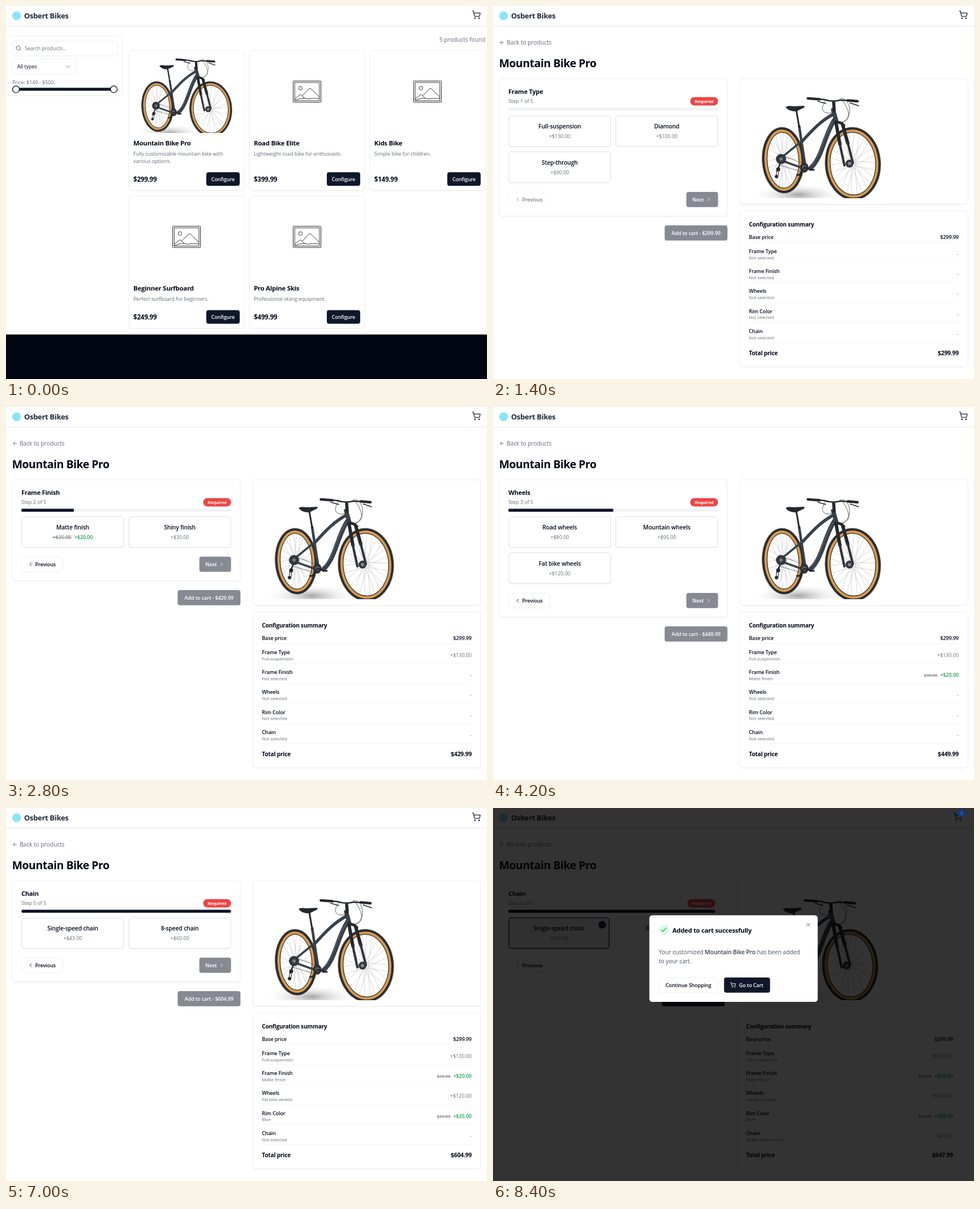
An HTML page for the animation above (9100 ms loop, 850 px wide and 658 px high).

```html
<!DOCTYPE html>
<html lang="en">
<head>
<meta charset="utf-8">
<title>Bike shop configurator</title>
<style>
  html, body { margin: 0; width: 100%; height: 100%; overflow: hidden; background: #fff; }
  svg { display: block; width: 850px; height: 658px; }
  text { font-family: "Open Sans", "Noto Sans", sans-serif; letter-spacing: -.008em; white-space: pre; }
  .b { font-weight: 600; letter-spacing: -.015em; }
  .h { font-weight: 700; letter-spacing: -.022em; }
  .m { text-anchor: middle; }
  .e { text-anchor: end; }
  .s { text-decoration: line-through; }
  .line { fill: none; stroke-linecap: round; stroke-linejoin: round; }
  .scene { visibility: hidden; animation: show 9.1s step-end infinite; animation-delay: calc(var(--i) * .7s - 9.1s); }
  @keyframes show {
    0% { visibility: visible; }
    7.7%, 100% { visibility: hidden; }
  }
</style>
</head>
<body>
<svg id="stage" viewBox="0 0 850 658" xmlns="http://www.w3.org/2000/svg"></svg>
<script>
const INK = '#020817', DARK = '#0f172a', GRAY = '#666c77', EDGE = '#e5e7eb', GREEN = '#16a34a';
const BASE = 299.99;
const money = v => '$' + v.toFixed(2);

const text = (x, y, s, size = 9.33, cls = '', fill = INK) =>
  `<text x="${x}" y="${y}" font-size="${size * .97}" class="${cls}" fill="${fill}">${s}</text>`;
const rect = (x, y, w, h, r = 0, fill = '#fff', stroke = 'none', sw = .67) =>
  `<rect x="${x}" y="${y}" width="${w}" height="${h}" rx="${r}" fill="${fill}" stroke="${stroke}" stroke-width="${sw}"/>`;
const circle = (x, y, r, fill = 'none', stroke = 'none', sw = 1) =>
  `<circle cx="${x}" cy="${y}" r="${r}" fill="${fill}" stroke="${stroke}" stroke-width="${sw}"/>`;
const line = (d, stroke = INK, sw = 1) =>
  `<path class="line" d="${d}" stroke="${stroke}" stroke-width="${sw}"/>`;
const card = (x, y, w, h) =>
  rect(x, y + .7, w, h, 5.3, '#f3f3f4') + rect(x + .33, y + .33, w - .67, h - .67, 5, '#fff', EDGE);
const fade = (s, o) => `<g opacity="${o}">${s}</g>`;

// Icons drawn on a 24 unit grid
const icon = (x, y, size, d, color = INK) =>
  `<g transform="translate(${x} ${y}) scale(${size / 24})">${line(d, color, 2)}</g>`;
const ICON = {
  cart: 'M2 2h2l2.7 12.4a2 2 0 0 0 2 1.6h9.8a2 2 0 0 0 1.9-1.6L22 7H5.1M7 21a1 1 0 1 0 2 0 1 1 0 1 0-2 0M18 21a1 1 0 1 0 2 0 1 1 0 1 0-2 0',
  search: 'M3 11a8 8 0 1 0 16 0 8 8 0 1 0-16 0M21 21l-4.3-4.3',
  down: 'M6 9l6 6 6-6',
  left: 'M15 18l-6-6 6-6',
  right: 'M9 18l6-6-6-6',
  back: 'M12 19l-7-7 7-7M19 12H5',
  check: 'M20 6L9 17l-5-5',
  close: 'M18 6L6 18M6 6l12 12'
};

function wheel(cx, cy, rx, ry) {
  const ring = (d, color, sw, extra = '') =>
    `<ellipse rx="${rx - d}" ry="${ry - d}" fill="none" stroke="${color}" stroke-width="${sw}" ${extra}/>`;
  let spokes = '';
  for (let k = 0; k < 26; k++) {
    const a = k * Math.PI / 13, b = a + (k % 2 ? .9 : -.9);
    spokes += `M${4 * Math.cos(b)} ${5 * Math.sin(b)}L${(rx - 9) * Math.cos(a)} ${(ry - 9) * Math.sin(a)}`;
  }
  return `<g transform="translate(${cx} ${cy}) rotate(-3)">`
    + line(spokes, '#a5a7aa', .45) + ring(9, '#2b2d31', 1.8) + ring(6.5, '#dd9b48', 4.3)
    + ring(2.6, '#2a2c30', 3.9) + ring(.6, '#2a2c30', 1.4, 'stroke-dasharray="2 1.2"') + '</g>';
}

function bike() {
  const frame = '#39414a', black = '#25282d';
  return '<ellipse cx="540" cy="333" rx="82" ry="21" fill="url(#shade)"/>'
    + wheel(512.5, 272, 37.3, 58.5)
    + line('M509 268L546 238M511 273L550 287', frame, 3.6)
    + line('M506 262L549 278M507 281L548 293', '#55585c', .8)
    + circle(509, 270, 9, '#34373c') + circle(509, 270, 3, '#777b80')
    + line('M507 279L502 291', black, 2.6)
    + circle(504, 288, 3.6, black) + circle(501, 301, 3, black)
    + line('M501 291V300M505 291L504 300', black, 1)
    + line('M541 212L552 284', frame, 4.6)
    + line('M536 184L541 213', black, 3)
    + '<path d="M517 178Q522 175 530 177L550 176Q552 179 546 181L536 186Q522 186 517 178Z" fill="#25282d"/>'
    + line('M546 239C560 224 576 204 603 190', frame, 5.4)
    + line('M604 200C586 226 582 268 561 286', frame, 8)
    + line('M601 204C585 226 580 262 563 280', '#586069', 1.4)
    + line('M601 183L607 204', frame, 7.5)
    + `<ellipse cx="550" cy="285" rx="7.500" ry="9" fill="#2f3237"/>` + circle(550, 285, 4, '#5a5e63')
    + line('M550 285L562 289M550 285L542 297', black, 2.4)
    + line('M560 289h7M537 298h8', black, 2.8)
    + wheel(636, 278, 49.5, 64.5)
    + line('M606 205L613 244M618 210L627 242', black, 6)
    + line('M613 244L621 281M627 242L636 277', '#30343a', 4.2)
    + line('M605 206Q614 203 620 211', black, 5)
    + circle(630, 278, 7, '#34373c') + circle(630, 278, 3, '#85888c')
    + line('M602 170L603 184', black, 5.5)
    + line('M556 163L585 165Q600 170 614 166L645 168', black, 2.6)
    + line('M556.500 163L577 164.500M627 166.500L644 168', black, 4.6)
    + line('M574 168L588 172M631 171L646 176', black, 1.6)
    + line('M588 166C576 184 584 192 601 188M618 167C634 190 632 206 610 205M613 164C630 158 640 196 616 206', '#3a3d42', .8);
}

function placeholder(cx, cy) {
  return `<g transform="translate(${cx} ${cy})">`
    + rect(-24.5, -18.7, 49, 37.4, .8, '#fff', '#222', 1) + rect(-21.8, -16, 43.6, 32, 0, '#fff', '#222', .9)
    + circle(-11.7, -6, 3.2, 'none', '#222', .9)
    + line('M-21.8 13L-13 5.8Q-11.5 4.8 -10 6.2L-4 12M-8.5 7.5L3.5 -5Q5 -6.4 6.8 -5L21.8 9.5M-21.8 15.5Q-8 9.5 1 12.8Q10 11.5 21.8 12', '#222', .9)
    + '</g>';
}

const header = right => rect(0, 0, 850, 658)
  + rect(0, 34.7, 850, .8, 0, EDGE) + rect(0, 35.5, 850, 1, 0, '#f4f4f5')
  + circle(18.7, 17.2, 7.8, '#8be4fb')
  + text(32, 21.7, 'Osbert Bikes', 13.33, 'h', '#1f2937')
  + icon(right - 16, 7.67, 16, ICON.cart, '#1f2937');

function shop() {
  const goods = [
    ['Mountain Bike Pro', 299.99, 'Fully customizable mountain bike with', 'various options.'],
    ['Road Bike Elite', 399.99, 'Lightweight road bike for enthusiasts.'],
    ['Kids Bike', 149.99, 'Simple bike for children.'],
    ['Beginner Surfboard', 249.99, 'Perfect surfboard for beginners.'],
    ['Pro Alpine Skis', 499.99, 'Professional skiing equipment.']
  ];
  let out = header(839.33)
    + card(2.7, 53.3, 203, 105)
    + rect(11, 62, 186, 26, 4, '#fff', EDGE) + icon(16.7, 69, 10.67, ICON.search, '#4b5563')
    + text(33, 78.3, 'Search products...', 9.33, '', GRAY)
    + rect(11, 94, 113, 26, 4, '#fff', EDGE) + text(20, 110.3, 'All types')
    + icon(104.7, 101.8, 10.67, ICON.down, GRAY)
    + text(11, 138, 'Price: $149 - $500', 9.33, '', GRAY)
    + rect(11, 144.2, 186, 5.3, 2.67, DARK)
    + circle(17.7, 146.9, 6, '#fff', DARK, 1.33) + circle(190.5, 146.9, 6, '#fff', DARK, 1.33)
    + text(847.3, 63, '5 products found', 10.67, 'e', GRAY);
  goods.forEach(([name, price, ...info], i) => {
    const row = i / 3 | 0, x = 216.7 + i % 3 * 212.9, y = 78 + row * 256.3;
    const foot = row ? 536.5 : 293.3;
    out += card(x, y, 204.7, row ? 234.5 : 247.7)
      + (i ? placeholder(x + 102.4, y + 73) : '<g clip-path="url(#thumb)"><use href="#bike" transform="translate(-123.4 -30.1) scale(.763)"/></g>')
      + text(x + 8.3, y + 168, name, 11.8, 'h')
      + info.map((s, k) => text(x + 8.3, y + 185.5 + k * 13.3, s, 9.33, '', GRAY)).join('')
      + text(x + 8.3, foot + 16.5, money(price), 12, 'h')
      + rect(x + 137.3, foot, 59, 24, 4, DARK)
      + text(x + 166.8, foot + 15.3, 'Configure', 9.33, 'b m', '#fff');
  });
  return out + rect(0, 579.5, 850, 78.5, 0, '#020612');
}

// Options: name, price, former price, blocked
const PARTS = [
  { name: 'Frame Type', pick: 0, opts: [['Full-suspension', 130], ['Diamond', 100], ['Step-through', 90]] },
  { name: 'Frame Finish', pick: 0, opts: [['Matte finish', 20, 35], ['Shiny finish', 30]] },
  { name: 'Wheels', pick: 2, opts: [['Road wheels', 80], ['Mountain wheels', 95], ['Fat bike wheels', 120]] },
  { name: 'Rim Color', pick: 2, opts: [['Red', 20, 0, true], ['Black', 15], ['Blue', 35, 20]] },
  { name: 'Chain', pick: 0, opts: [['Single-speed chain', 43], ['8-speed chain', 60]] }
];
const chosen = p => p.opts[p.pick];

function option([name, price, old, blocked], x, y, w, h, on) {
  const mid = x + w / 2;
  const cost = old
    ? `<tspan class="s">+${money(old)}</tspan><tspan dx="5.5" class="b" fill="${price < old ? GREEN : '#ea6a1c'}">+${money(price)}</tspan>`
    : '+' + money(price);
  return rect(x, y + .8, w, h, 5.3, '#f3f3f4')
    + rect(x + .67, y + .67, w - 1.33, h - 1.33, 4.7, on ? '#f1f2f4' : blocked ? '#f4f5f7' : '#fff', on ? DARK : EDGE, 1.33)
    + text(mid, y + 23.3, name, 10.67, 'b m', blocked ? '#7d838e' : INK)
    + text(mid, y + 40.3, cost, 9.33, 'm', blocked ? '#a4a9b2' : GRAY)
    + (blocked ? text(mid, y + 56.3, 'Incompatible with your selection', 8, 'b m', '#a4a9b2') : '')
    + (on ? circle(x + w - 13, y + 13, 6.67, DARK) + icon(x + w - 17, y + 9, 8, ICON.check, '#fff') : '');
}

function summary(x, right, count, total) {
  const r = right - 16.5, l = x + 16.6;
  let out = card(x, 360.7, right - x, 276)
    + text(l, 389, 'Configuration summary', 10.4, 'h')
    + text(l, 411, 'Base price', 9.33, 'b') + text(r, 411, money(BASE), 9.33, 'b e')
    + rect(l, 417, r - l, .7, 0, '#eff0f2');
  PARTS.forEach((p, i) => {
    const y = 436 + i * 35.2, set = i < count, [name, price, old] = chosen(p);
    const cost = !set ? '-' : old
      ? `<tspan class="s" font-size="7.76">${money(old)}</tspan><tspan dx="5" class="b" fill="${GREEN}">+${money(price)}</tspan>`
      : '+' + money(price);
    out += text(l, y, p.name, 9.33, 'b') + text(l, y + 10.8, set ? name : 'Not selected', 8, '', GRAY)
      + text(r, y + 5, cost, 9.33, 'e', GRAY) + rect(l, y + 16.4, r - l, .7, 0, '#eff0f2');
  });
  return out + text(l, 616, 'Total price', 10.5, 'h') + text(r, 616, money(total), 10.67, 'h e');
}

function configure(step, picked, right = 839.33) {
  const part = PARTS[step], left = 10.67, w = (right - left - 21.33) / 2, edge = left + w;
  const l = 27.3, r = edge - 16.67, optW = (r - l - 8) / 2, x2 = edge + 21.33;
  const count = step + picked, last = step === 4;
  const total = PARTS.slice(0, count).reduce((sum, p) => sum + chosen(p)[1], BASE);
  const firstH = part.opts[0][3] ? 71.3 : 55.3;
  const top = 193, row2 = top + firstH + 8.3;
  const foot = Math.round((part.opts.length > 2 ? row2 + 55.3 : top + firstH) + 16);
  const bottom = foot + 43, add = bottom + 16;
  const prev = rect(l + .3, foot + .3, 73, 26, 4, '#fff', EDGE)
    + icon(38.3, foot + 8, 10.67, ICON.left) + text(51.5, foot + 16.7, 'Previous', 9.33, 'b');
  const next = rect(r - 56, foot, 56, 26.67, 4, DARK)
    + text(r - 45.3, foot + 16.7, 'Next', 9.33, 'b', '#fff') + icon(r - 21.5, foot + 8, 10.67, ICON.right, '#fff');
  const buy = rect(edge - 111, add, 111, 26.67, 4, DARK)
    + text(edge - 55.5, add + 16.7, 'Add to cart - ' + money(total), 9.33, 'b m', '#fff');

  return header(right)
    + icon(10.5, 59, 10.67, ICON.back, GRAY) + text(24, 68, 'Back to products', 10.67, '', GRAY)
    + text(left, 107.5, 'Mountain Bike Pro', 20, 'h')
    + card(left, 128, w, bottom - 128)
    + text(l, 155.3, part.name, 11.4, 'h') + text(l, 171, `Step ${step + 1} of 5`, 9.33, '', GRAY)
    + rect(r - 49.2, 160.7, 49.2, 14.7, 7.3, '#ef4444') + text(r - 24.6, 171, 'Required', 8, 'h m', '#fff')
    + rect(l, 179.5, r - l, 5.3, 2.67, '#f1f2f4')
    + (step ? rect(l, 179.5, (r - l) * step / 4, 5.3, last ? 2.67 : 1.2, '#0f1129') : '')
    + part.opts.map((o, i) => option(o, l + i % 2 * (optW + 8), i < 2 ? top : row2, optW, i < 2 ? firstH : 55.3, picked && i === part.pick)).join('')
    + fade(prev, step ? 1 : .5) + fade(next, picked && !last ? 1 : .5) + fade(buy, picked && last ? 1 : .5)
    + card(x2, 128, right - x2, 222)
    + `<use href="#bike" clip-path="url(#photo)" x="${(right - 839.33) / 2}"/>`
    + summary(x2, right, count, total);
}

function added() {
  return configure(4, 1, 829.33)
    + rect(0, 0, 850, 658, 0, 'rgba(0,0,0,.8)')
    + circle(828, 9, 6.67, '#143a85') + text(828, 11.9, '1', 8, 'm', '#a9b6d0')
    + rect(276.3, 189.3, 297.5, 152.7, 5.3)
    + circle(302, 215, 9.3, '#dcfce7') + icon(295.3, 208.3, 13.33, ICON.check, GREEN)
    + text(317, 220, 'Added to cart successfully', 11.6, 'h')
    + icon(551.8, 200.5, 10.67, ICON.close, '#4b5563')
    + text(293, 257.5, 'Your customized <tspan class="b" fill="#374151">Mountain Bike Pro</tspan> has been added', 10.67, '', '#4b5563')
    + text(293, 273.5, 'to your cart.', 10.67, '', '#4b5563')
    + rect(293.3, 299.3, 104.4, 26, 4, '#fff', EDGE) + text(345.3, 315.5, 'Continue Shopping', 9.33, 'b m')
    + rect(408.3, 299, 81.3, 26.67, 4, DARK) + icon(419, 306.8, 10.67, ICON.cart, '#fff')
    + text(434.7, 315.5, 'Go to Cart', 9.33, 'b', '#fff');
}

const scenes = [shop(), shop()];
for (let step = 0; step < 5; step++) scenes.push(configure(step, 0), configure(step, 1));
scenes.push(added());

document.getElementById('stage').innerHTML = `<defs>
  <radialGradient id="shade"><stop offset="0" stop-color="#a6a6a6"/><stop offset="1" stop-color="#fff" stop-opacity="0"/></radialGradient>
  <clipPath id="photo"><rect x="436" y="129" width="403" height="210"/></clipPath>
  <clipPath id="thumb"><rect x="217" y="78" width="204" height="146"/></clipPath>
  <g id="bike">${bike()}</g>
</defs>` + scenes.map((s, i) => `<g class="scene" style="--i:${i}">${s}</g>`).join('');
</script>
</body>
</html>
```
